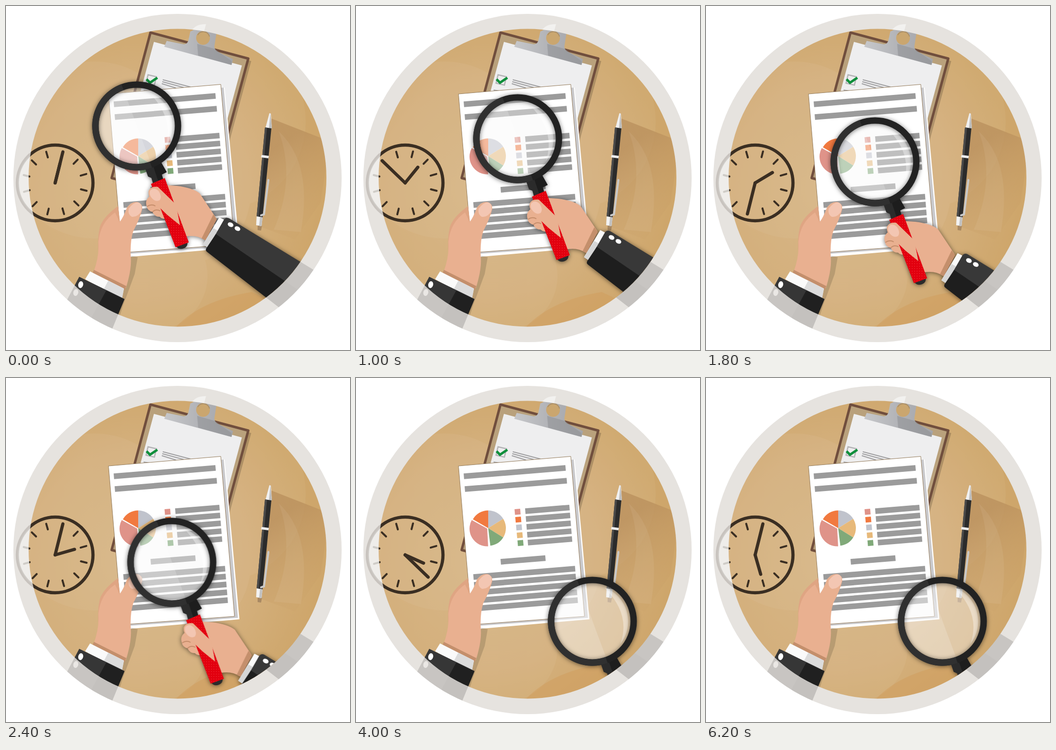
Animation, 700 px wide and 700 px high, one loop 6.4 s. Source, as an HTML page:

```html
<!DOCTYPE html>
<html lang="en">
<head>
<meta charset="utf-8">
<title>Document review</title>
<style>
  html, body { margin: 0; height: 100%; overflow: hidden; background: #fff; }
  svg { display: block; width: 100vw; height: 100vh; }
  .glow { filter: drop-shadow(0 1px 5px rgba(0, 0, 0, .55)); }
</style>
</head>
<body>
<svg viewBox="0 0 700 700">
  <defs>
    <clipPath id="disc"><circle cx="349" cy="349.500" r="303"/></clipPath>
    <clipPath id="rim"><circle cx="349" cy="350" r="334"/></clipPath>
    <radialGradient id="desk" gradientUnits="userSpaceOnUse" cx="270" cy="370" r="370">
      <stop offset="0" stop-color="#d8b788"/><stop offset=".6" stop-color="#d4b07d"/><stop offset="1" stop-color="#cea66b"/>
    </radialGradient>
    <linearGradient id="cast" gradientUnits="userSpaceOnUse" x1="530" y1="300" x2="620" y2="440">
      <stop offset="0" stop-color="#b98f5c" stop-opacity=".75"/><stop offset="1" stop-color="#c79d65" stop-opacity=".15"/>
    </linearGradient>
    <linearGradient id="metal" x1="0" x2="1">
      <stop offset="0" stop-color="#c6c7ca"/><stop offset=".5" stop-color="#b2b3b7"/><stop offset="1" stop-color="#a3a4a8"/>
    </linearGradient>
    <pattern id="grip" width="5" height="5" patternUnits="userSpaceOnUse">
      <path fill="#e2000f" d="M0 0H5V5H0Z"/><circle cx="1.500" cy="1.500" r=".6" fill="#ff5a5a"/>
    </pattern>

    <g id="clock" fill="none" stroke="#3a2e22" stroke-linecap="round">
      <circle cx="100" cy="360" r="77" stroke-width="6.500"/>
      <g id="ticks" stroke-width="4"></g>
    </g>

    <g id="jacket">
      <path fill="#363636" d="M149 551 241 596 214 662 110 625Z"/>
      <path fill="#202020" d="M204 579 241 597 214 662 165 650Z"/>
      <g fill="#fff">
        <ellipse cx="152" cy="567" rx="5" ry="7" transform="rotate(15 152 567)"/>
        <ellipse cx="142" cy="583" rx="5" ry="7" transform="rotate(15 142 583)"/>
      </g>
    </g>

    <g id="sleeve">
      <path fill="#383838" d="M444 434Q448 429 454 432L780 631 700 725 408 497Z"/>
      <path fill="#1e1e1e" d="M427 464 740 677 700 725 410 501Q404 497 409 491Z"/>
    </g>
  </defs>

  <circle cx="349" cy="350" r="334" fill="#e6e3df"/>
  <g clip-path="url(#rim)">
    <circle cx="100" cy="360" r="76" fill="#fff" opacity=".35"/>
    <g opacity=".17"><use href="#clock"/><use href="#jacket"/><use href="#sleeve"/></g>
    <path fill="#fff" opacity=".5" d="M376 52Q386 36 407 37L403 52Z"/>
  </g>

  <g clip-path="url(#disc)">
    <path fill="url(#desk)" d="M0 0H700V700H0Z"/>
    <g fill="#fff" opacity=".045">
      <circle cx="180" cy="293" r="180"/><circle cx="430" cy="235" r="180"/>
      <circle cx="350" cy="380" r="148"/><circle cx="300" cy="550" r="110"/>
    </g>
    <path fill="#d09a56" opacity=".4" d="M340 660Q390 600 500 582L560 610 470 660Z"/>

    <!-- pen -->
    <path fill="url(#cast)" d="M540 229 660 276 640 400 588 475 520 450Z"/>
    <path fill="#fff" opacity=".06" d="M555 255Q625 320 600 460L545 455Q590 350 555 255Z"/>
    <path fill="#a98963" d="M512 445 521 447 519 457 512 456Z"/>
    <path fill="#f0f0f0" d="M536 218 528 248 541 249 539 219Z"/>
    <path fill="#bdbdbd" d="M538 218 535 249 541 249Z"/>
    <path fill="#2b2b2b" d="M527 247 540 249 522 431 510 429Z"/>
    <path fill="#4a4a4a" d="M527 247 531 248 514 430 510 429Z"/>
    <path fill="#eee" d="M520 303 535 305 534 310 519 308Z"/>
    <path fill="#f2f2f2" d="M510 428 522 430 520 448 509 446Z"/>
    <path fill="#c2c2c2" d="M517 429 522 430 520 448 515 447Z"/>
    <path fill="none" stroke="#c9c9c9" stroke-width="4" stroke-linecap="round" d="M534 354 525 424 519 426"/>

    <!-- clock -->
    <use href="#clock"/>
    <g stroke="#3a2e22" stroke-width="6.500" stroke-linecap="round">
      <path id="hour" d="M100 360V319"/>
      <path id="minute" d="M100 360V295"/>
    </g>

    <!-- clipboard -->
    <path opacity=".18" d="M300 60 499 112 434 352 360 400Z"/>
    <path fill="#b9a17c" stroke="#704e3d" stroke-width="5" stroke-linejoin="round" d="M294 54 493 107 413 403 215 350Z"/>
    <path fill="#eeeeef" d="M301 73 480 121 410 380 230 335Z"/>
    <path fill="url(#metal)" d="M327 71 362 78Q371 77 372 66L375 52Q402 36 428 57L424 82Q424 91 434 95L462 108 459 120 322 83Z"/>
    <path fill="#929397" opacity=".6" d="M389 77 424 87 459 112V120L391 101Z"/>
    <circle cx="401" cy="65" r="14" fill="#caa66f"/>
    <path fill="none" stroke="#a98e68" stroke-width="2" d="M390 59A13 13 0 0 1 414 62"/>
    <path fill="none" stroke="#b3b3b5" stroke-width="2.500" d="M289 140 306 144 302 161 285 157Z"/>
    <path fill="none" stroke="#0f8f3b" stroke-width="5" d="M286 149 293 156 308 146"/>
    <path fill="none" stroke="#a0a0a2" stroke-width="2" d="M319 150 376 165M318 154 362 166M317 158 346 167M280 171 300 174"/>

    <!-- pages -->
    <path fill="#fff" d="M217 186 445 166 475 491 246 511Z"/>
    <path fill="#c9c9cc" d="M214 184 443 166 472 488 242 505Z"/>
    <path fill="#fff" stroke="#957c5c" d="M208.500 179 437 159.500 465 485 236 502Z"/>
    <g id="report"></g>

    <!-- left arm -->
    <path opacity=".14" d="M255 508 268 511 262 545 238 610 222 660 205 650Z"/>
    <path fill="#dfa583" d="M228 407Q197 430 191 450 186 470 188 505L232 470 232 440Z"/>
    <path fill="#e9b090" d="M178 542Q190 510 188 480 192 440 222 420L231 440Q240 428 246 410 256 397 268 399 279 403 277 414 272 434 259 458 252 480 254 512 256 535 244 574Z"/>
    <path fill="#f3c6b2" d="M250 412Q260 398 270 400 279 404 275 418 268 430 256 429 247 424 250 412Z"/>
    <path fill="#c48f6c" d="M179 537 245 570 241 578 175 545Z"/>
    <path fill="#fafafa" d="M171 540 240 575 235 598 161 556Z"/>
    <path fill="#dcdcdc" d="M208 559 240 575 236 597 198 578Z"/>
    <use href="#jacket"/>

    <!-- magnifier and right arm -->
    <g id="magnifier">
      <g>
        <circle cx="266" cy="244" r="79" fill="#f4f4f6" opacity=".4"/>
        <path fill="#fff" opacity=".17" d="M239 170A79 79 0 0 0 294 318Z"/>
        <path fill="#fff" opacity=".35" d="M290 175A74 74 0 0 1 323 290Q345 230 290 175Z"/>
      </g>
      <g class="glow">
        <g fill="#e9b090">
          <path d="M294 386Q282 394 286 407 288 417 298 419 302 429 313 429 318 435 330 432L330 390Z"/>
          <path d="M318 364 348 366Q380 370 394 381L428 432 404 476Q388 465 366 469 350 458 330 430Z"/>
        </g>
        <path fill="none" stroke="#c58d6b" stroke-width="2" d="M287 408Q296 402 304 407M298 419Q305 412 314 417"/>
        <path fill="#c48f6c" d="M422 424 429 434 406 477 398 473Z"/>
        <path fill="#fafafa" d="M434 430 446 436 414 494 401 485Z"/>
        <path fill="#d6d6d6" d="M422 452 434 459 414 494 401 485Z"/>
        <use href="#sleeve"/>
        <g fill="#fff">
          <ellipse cx="457" cy="445" rx="6" ry="4.500" transform="rotate(25 457 445)"/>
          <ellipse cx="471" cy="453" rx="6" ry="4.500" transform="rotate(25 471 453)"/>
        </g>
        <path fill="#2b2b2b" d="M283 330 315 317 327 338 317 343 320 353 299 361 296 350 289 347Z"/>
        <path fill="#1d1d1d" d="M299 324 315 317 327 338 317 343 320 353 310 357Z"/>
        <path fill="#2b2b2b" d="M346 489Q352 497 362 493 371 489 369 479Z"/>
        <path fill="url(#grip)" d="M295 362 323 350 372 481 345 491Z"/>
        <path fill="#e9b090" d="M290 377Q294 366 309 368L346 404 354 446 328 425 300 398Q289 390 290 377Z"/>
        <path fill="#f3c6b2" d="M293 376Q301 367 311 377 318 388 313 395 304 400 296 390 291 384 293 376Z"/>
        <circle cx="266" cy="244" r="84" fill="none" stroke="#222" stroke-width="13"/>
        <path fill="none" stroke="#303030" stroke-width="13" d="M237 165A84 84 0 0 0 295 323"/>
      </g>
    </g>
  </g>
</svg>
<script>
const $ = id => document.getElementById(id);
const SLOPE = 0.082;

const bar = (x, y, w) =>
  `<path stroke="#9b9b9b" stroke-width="11.500" d="M${x} ${y}l${w} ${-w * SLOPE}"/>`;

const bars = (count, x, y, w) =>
  Array.from({ length: count }, (_, i) => bar(x + i * 1.3, y + i * 16, w)).join('');

function slice(color, from, to, dx = 0, dy = 0) {
  const cx = 269 + dx, cy = 305.5 + dy, r = 36;
  const rim = deg => {
    const a = deg * Math.PI / 180;
    return `${cx + r * Math.sin(a)} ${cy - r * Math.cos(a)}`;
  };
  return `<path fill="${color}" d="M${cx} ${cy}L${rim(from)}A${r} ${r} 0 0 1 ${rim(to)}Z"/>`;
}

const colors = ['#df9389', '#f1793f', '#c0c3cc', '#e7b97a', '#80a979'];
const [pink, orange, gray, sand, green] = colors;

$('report').innerHTML =
  bar(219.5, 200, 207) + bar(221.5, 226, 207.5) +
  bars(5, 344.5, 271, 90) + bar(294.5, 374, 91) + bars(5, 239, 405, 207) +
  slice(orange, -60, 0) + slice(gray, 0, 58) + slice(sand, 58, 122) +
  slice(green, 122, 173) + slice(pink, 177, 299, -2, 1) +
  colors.map((c, i) =>
    `<rect x="${323 + i * 1.5}" y="${266.5 + i * 16}" width="11.500" height="11.500" fill="${c}" transform="rotate(-5 329 ${272 + i * 16})"/>`
  ).join('');

$('ticks').innerHTML = Array.from({ length: 12 }, (_, i) =>
  `<path d="M100 294v12" transform="rotate(${14 + i * 30} 100 360)"/>`).join('');

// Lens centre: [step, x, y]
const route = [
  [0, 266, 244], [1, 318, 226], [2, 362, 217], [3, 372, 222], [5, 329, 270],
  [6, 348, 313], [7, 394, 314], [8, 378, 314], [9, 344, 317], [10, 326, 334],
  [12, 337.5, 375], [14, 350, 406], [16, 379, 431], [18, 427, 462], [20, 481, 495]
];

function lensAt(step) {
  const i = route.findIndex(p => p[0] >= step);
  if (i < 0) return route.at(-1).slice(1);
  if (i === 0) return route[0].slice(1);
  const [s0, x0, y0] = route[i - 1], [s1, x1, y1] = route[i];
  const k = (step - s0) / (s1 - s0);
  return [x0 + (x1 - x0) * k, y0 + (y1 - y0) * k];
}

function draw() {
  const tick = Math.floor(performance.now() % 6400 / 200);
  const step = tick > 20 ? tick - 1 : tick; // one beat of rest
  const [x, y] = lensAt(step);
  $('magnifier').setAttribute('transform', `translate(${x - 266} ${y - 244})`);
  $('minute').setAttribute('transform', `rotate(${14 + step * 60} 100 360)`);
  $('hour').setAttribute('transform', `rotate(${14 + step * 5} 100 360)`);
  requestAnimationFrame(draw);
}
draw();
</script>
</body>
</html>
```
